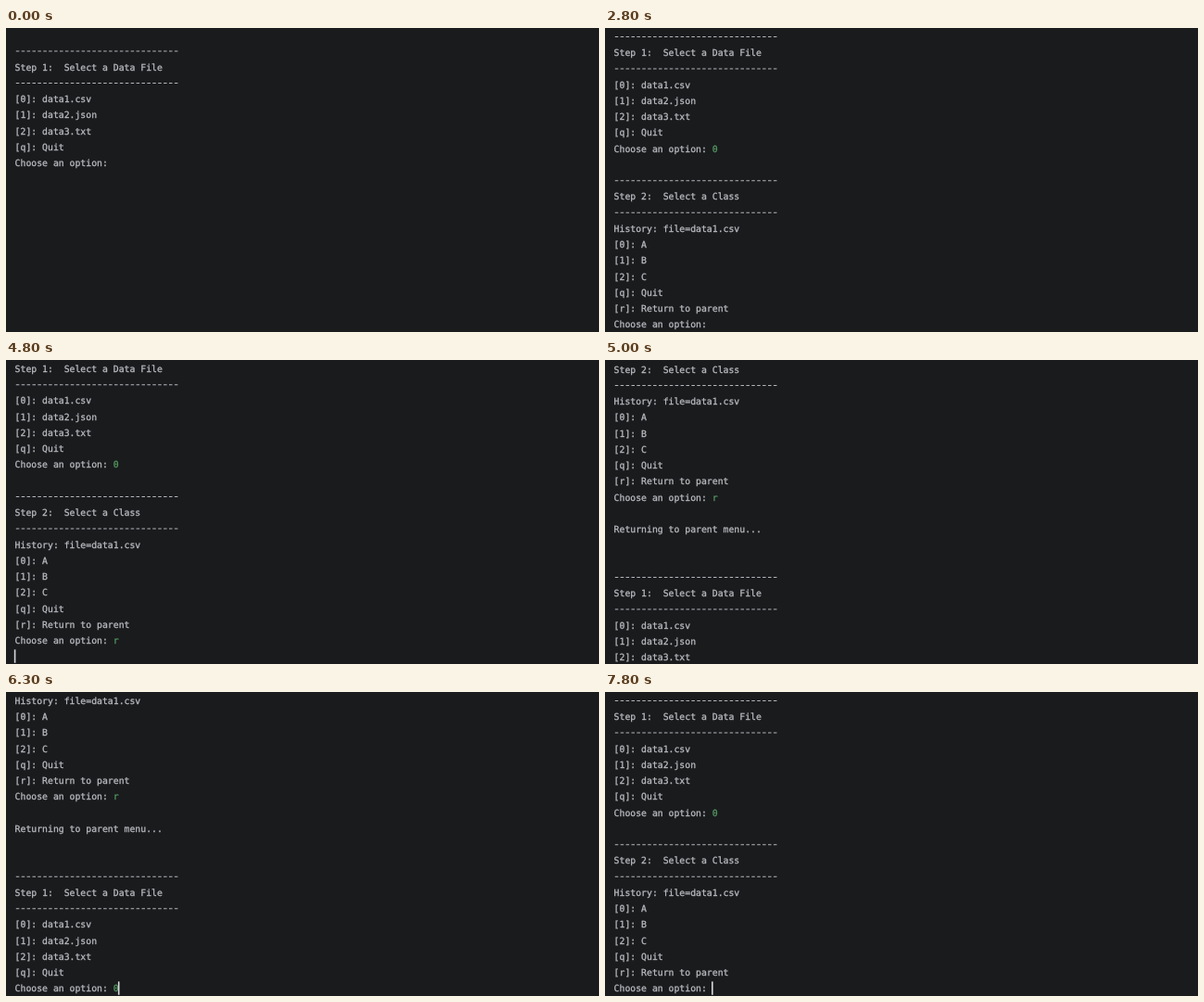
Animation of 640x328 px, one loop 8000 ms. Source, as an HTML page:

```html
<!DOCTYPE html>
<html lang="en">
<head>
<meta charset="utf-8">
<title>Console menu</title>
<style>
  html, body { margin: 0; width: 100%; height: 100%; overflow: hidden; background: #1a1b1d; }
  svg { display: block; width: 640px; height: 328px; }
  text {
    font: 9.8px "DejaVu Sans Mono", monospace;
    white-space: pre;
    text-rendering: geometricPrecision;
    fill: #bbbdc2;
    stroke: #bbbdc2;
    stroke-width: .28;
  }
  .answer { fill: #559a62; stroke: #559a62; }
  .rule { stroke: #b4b6bb; stroke-width: 1.05; stroke-dasharray: 3.5 2.4; }
  #caret { fill: #d6d8dc; }
</style>
</head>
<body>
<svg viewBox="0 0 640 328">
  <g id="log"></g>
  <rect id="caret" width="1.6" height="14.4"/>
</svg>
<script>
const LEFT = 9.6, COL = 5.9, ROW = 17.25, LOOP = 8000;
const RULE = '-', PROMPT = 'Choose an option: ';
const END = PROMPT.length;

const title = text => [RULE, text, RULE];
const fileMenu = [
  ...title('Step 1:  Select a Data File'),
  '[0]: data1.csv', '[1]: data2.json', '[2]: data3.txt', '[q]: Quit', PROMPT
];
const classMenu = [
  ...title('Step 2:  Select a Class'), 'History: file=data1.csv',
  '[0]: A', '[1]: B', '[2]: C', '[q]: Quit', '[r]: Return to parent', PROMPT
];
const lines = [
  ...fileMenu, '', ...classMenu, '',
  'Returning to parent menu...', '', '', ...fileMenu, '', ...classMenu
];

const log = document.getElementById('log');
const caret = document.getElementById('caret');

function add(tag, attrs, text = '') {
  const el = document.createElementNS('http://www.w3.org/2000/svg', tag);
  for (const name in attrs) el.setAttribute(name, attrs[name]);
  el.textContent = text;
  log.append(el);
  return el;
}

const addText = (row, col, text, cls = '') =>
  add('text', { x: LEFT + col * COL, y: row * ROW + 3.3, class: cls }, text);

const rows = lines.map((line, row) => {
  if (line !== RULE) return addText(row, 0, line);
  const y = row * ROW, x1 = LEFT + 1.2;
  return add('line', { x1, x2: x1 + 29 * COL + 3.5, y1: y, y2: y, class: 'rule' });
});

const answers = [[7, '0'], [18, 'r'], [30, '0']]
  .map(([row, key]) => addText(row, END, key, 'answer'));

// Vertical position that puts the given row on the last visible line
const bottom = row => 320 - row * ROW;

// [time, lines printed, y of first row, answers typed, caret row, caret column]
const steps = [
  [0,    8,  25,                0],
  [800,  8,  25,                0, 7, END],
  [1300, 8,  25,                0],
  [1500, 8,  25,                1, 7, END + 1],
  [1800, 8,  25,                1, 8, 0],
  [2100, 19, bottom(18),        1, 18, END],
  [2800, 19, bottom(18),        1],
  [3300, 19, bottom(18),        1, 18, END],
  [3800, 19, bottom(18),        1],
  [4300, 19, bottom(18),        2, 18, END + 1],
  [4800, 19, bottom(19),        2, 19, 0],
  [5000, 31, bottom(28) + .8,   2],
  [5100, 31, bottom(30),        2, 30, END],
  [5800, 31, bottom(30),        2],
  [6100, 31, bottom(30),        3, 30, END + 1],
  [6500, 31, bottom(31),        3, 31, 0],
  [6700, 42, bottom(39) + .8,   3],
  [6800, 42, bottom(41),        3, 41, END],
  [7300, 42, bottom(41),        3],
  [7800, 42, bottom(41),        3, 41, END]
];

const show = (el, on) => el.setAttribute('visibility', on ? 'visible' : 'hidden');
let shown;

function draw(time) {
  const step = steps.findLast(s => s[0] <= time);
  if (step === shown) return;
  shown = step;
  const [, printed, top, typed, row, col] = step;
  log.setAttribute('transform', `translate(0 ${top})`);
  rows.forEach((el, i) => show(el, i < printed));
  answers.forEach((el, i) => show(el, i < typed));
  show(caret, row !== undefined);
  if (row !== undefined) {
    caret.setAttribute('x', LEFT + col * COL - .8);
    caret.setAttribute('y', top + row * ROW - 7.6);
  }
}

const start = performance.now();
function tick() {
  draw((performance.now() - start) % LOOP);
  requestAnimationFrame(tick);
}
tick();
</script>
</body>
</html>
```
